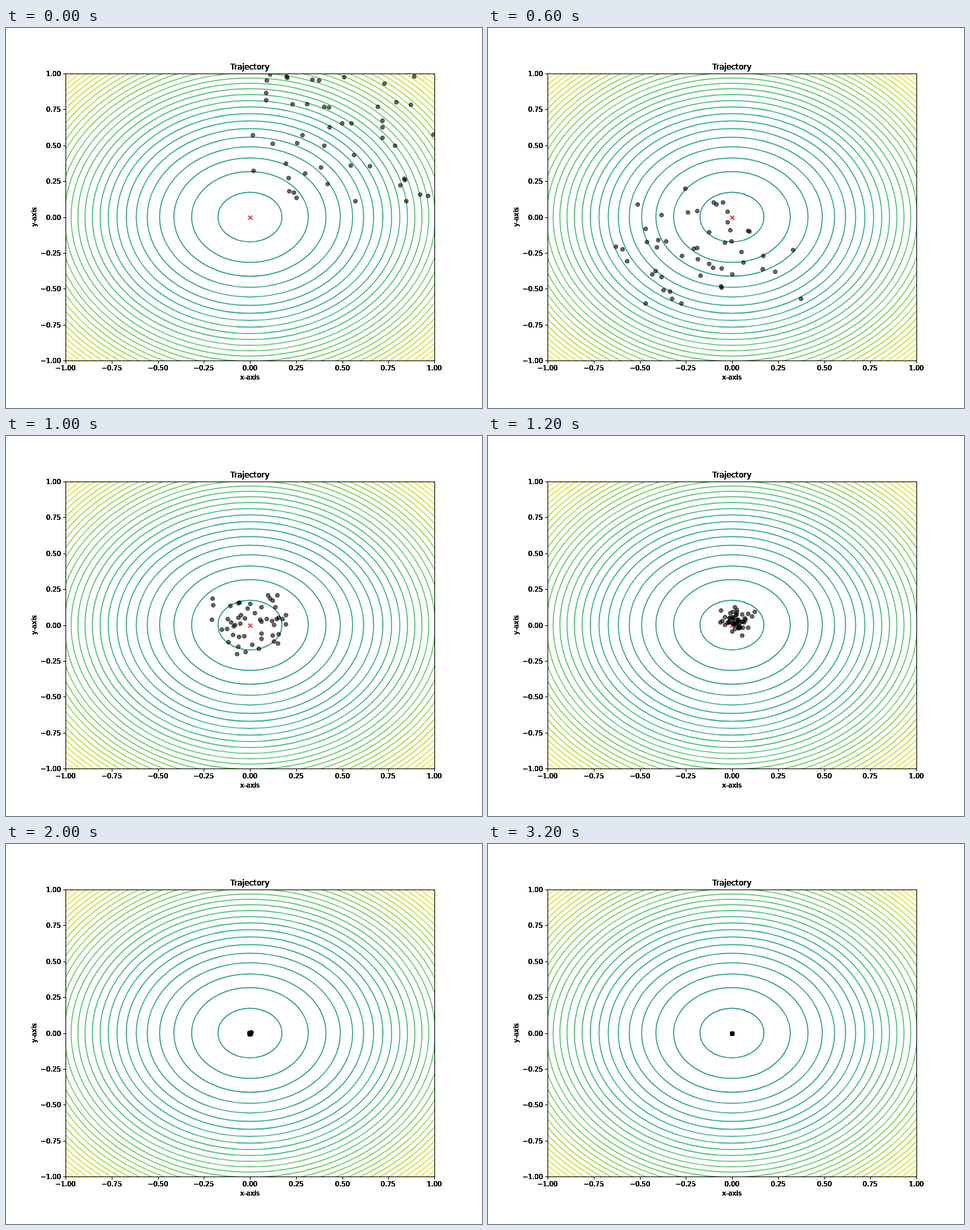
An HTML page with a canvas that plays this animation: 720 by 576 pixels, repeating every 10000 ms.

```html
<!DOCTYPE html>
<html>
<head>
<meta charset="utf-8">
<style>
html, body { margin: 0; width: 720px; height: 576px; overflow: hidden; background: #fff; }
canvas { display: block; }
</style>
</head>
<body>
<canvas id="stage" width="720" height="576"></canvas>
<script>
const ctx = document.getElementById('stage').getContext('2d');
const LEFT = 90, RIGHT = 648, TOP = 69.12, BOTTOM = 504;
const CX = 369, CY = 286.56, SX = 279, SY = 217.44;
const LOOP = 10000, STEP = 100, LAST = 32, COUNT = 50;

// Pixel centre nearest to a position
const snap = p => Math.round(p) + 0.5;

function random(n) {
  const s = Math.sin(n * 12.9898 + 4.1) * 43758.5453;
  return s - Math.floor(s);
}

// Damped swing about zero that gathers speed after the first steps
function swing(seed, k) {
  const start = random(seed);
  const push = 0.15 + 1.3 * random(seed + 200);
  const rate = 0.5 + 0.4 * random(seed + 400);
  const fade = 1.2 / (1 + 0.2 * Math.exp(0.36 * k));
  const angle = rate * k * k / (k + 2);
  return fade * (start * Math.cos(angle) + push * Math.sin(angle));
}

const ramp = [[33, 145, 140], [40, 174, 128], [94, 201, 98], [173, 220, 48], [253, 231, 37]];

function levelColor(level) {
  const u = ((level + 2) / 3.99 - 0.5) * 8;
  const i = Math.min(3, Math.floor(u));
  const mix = ramp[i].map((c, j) => Math.round(c + (ramp[i + 1][j] - c) * (u - i)));
  return `rgb(${mix})`;
}

function line(x1, y1, x2, y2) {
  ctx.beginPath();
  ctx.moveTo(x1, y1);
  ctx.lineTo(x2, y2);
  ctx.stroke();
}

// Repeated passes give the labels their heavy edges
function label(text, x, y, align = 'center', size = 10) {
  ctx.font = `${size}px "DejaVu Sans", sans-serif`;
  ctx.textAlign = align;
  for (let i = 0; i < 8; i++) ctx.fillText(text, x, y);
}

function drawContours() {
  ctx.lineWidth = 1.5;
  for (let i = 0; i < 29; i++) {
    const level = 0.03 + 0.07 * i, r = Math.sqrt(level);
    ctx.strokeStyle = levelColor(level);
    ctx.beginPath();
    ctx.ellipse(CX, CY, r * SX, r * SY, 0, 0, 2 * Math.PI);
    ctx.stroke();
  }
}

function drawGoal() {
  const x = snap(CX), y = snap(CY);
  ctx.strokeStyle = '#f00';
  ctx.lineWidth = 1.5;
  line(x - 3, y - 3, x + 3, y + 3);
  line(x - 3, y + 3, x + 3, y - 3);
}

function drawSwarm(k) {
  ctx.fillStyle = ctx.strokeStyle = 'rgba(0,0,0,0.6)';
  ctx.lineWidth = 1;
  for (let i = 0; i < COUNT; i++) {
    const x = snap(CX + SX * swing(2 * i, k));
    const y = snap(CY - SY * swing(2 * i + 1, k));
    ctx.beginPath();
    ctx.arc(x, y, 3, 0, 2 * Math.PI);
    ctx.fill();
    ctx.stroke();
  }
}

function drawAxes() {
  ctx.fillStyle = ctx.strokeStyle = '#000';
  ctx.lineWidth = 1;
  ctx.strokeRect(90.5, 69.5, 558, 435);
  for (let i = -4; i <= 4; i++) {
    const value = i / 4;
    const text = value.toFixed(2).replace('-', '\u2212');
    const x = CX + value * SX, y = CY - value * SY;
    line(snap(x), 504.5, snap(x), 508.5);
    line(86.5, snap(y), 90.5, snap(y));
    label(text, Math.round(x), 519);
    label(text, 83, Math.round(y) + 4, 'right');
  }
  label('Trajectory', CX, 63, 'center', 12);
  label('x-axis', CX, 533);
  ctx.save();
  ctx.translate(46, CY);
  ctx.rotate(-Math.PI / 2);
  label('y-axis', 0, 0);
  ctx.restore();
}

function draw(time) {
  const k = Math.min(LAST, Math.floor(time % LOOP / STEP));
  ctx.fillStyle = '#fff';
  ctx.fillRect(0, 0, 720, 576);
  ctx.save();
  ctx.beginPath();
  ctx.rect(LEFT, TOP, RIGHT - LEFT, BOTTOM - TOP);
  ctx.clip();
  drawContours();
  drawGoal();
  drawSwarm(k);
  ctx.restore();
  drawAxes();
}

let begin;
function tick(now) {
  begin ??= now;
  draw(now - begin);
  requestAnimationFrame(tick);
}
requestAnimationFrame(tick);
</script>
</body>
</html>
```
